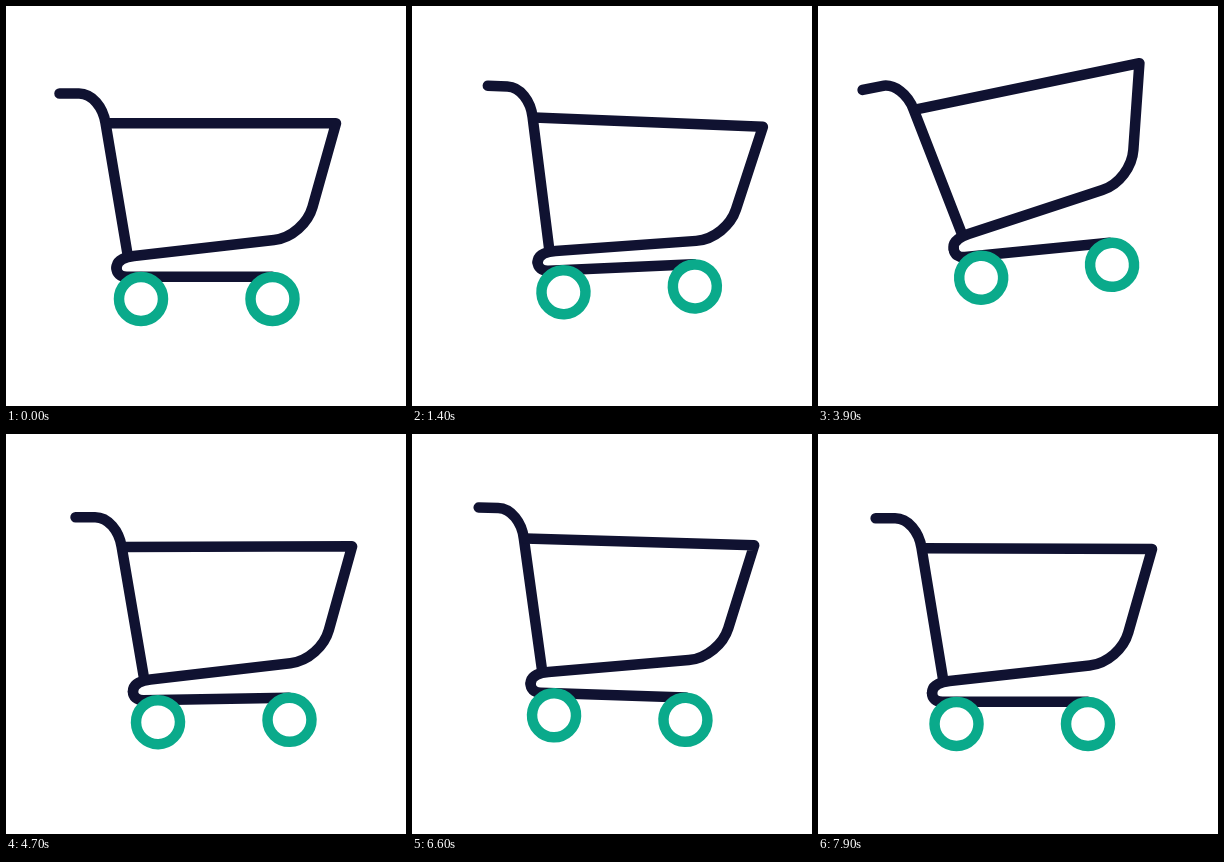
Animation, 400 px wide and 400 px high, one loop 8 s. Source, as an HTML page:

```html
<!DOCTYPE html>
<html lang="en">
<head>
<meta charset="utf-8">
<title>Shopping cart</title>
<style>
  html, body { margin: 0; height: 100%; overflow: hidden; background: #fff; }
  svg { display: block; width: 100vw; height: 100vh; }
  path { fill: none; stroke: #101231; stroke-width: 10.5; stroke-linecap: round; stroke-linejoin: round; }
  circle { fill: #fff; stroke: #0aaa8b; stroke-width: 10.5; }
</style>
</head>
<body>
<svg viewBox="0 0 400 400">
  <g id="base">
    <path d="M110.5 262C110.5 267 114 270.8 121 270.8H266"/>
    <g id="basket">
      <path d="M53.5 87.5H73C86 87.5 97 101 99.5 117L121.5 248"/>
      <path d="M101 117.3H330L306.5 201C302 217 286 232 268 234L128 250C116 251.5 110.5 255 110.5 262"/>
    </g>
    <circle cx="135" cy="293" r="22"/>
    <circle cx="266.5" cy="293" r="22"/>
  </g>
</svg>
<script>
const LOOP = 8, STEP = 0.1;
const base = document.getElementById('base');
const basket = document.getElementById('basket');

function draw(t) {
  // Smooth 0 to 1 between two times, in seconds
  const ease = (from, to) => {
    const u = Math.min(1, Math.max(0, (t - from) / (to - from)));
    return u * u * (3 - 2 * u);
  };
  const land = ease(3.45, 5.1);   // coming down from the wheelie
  const settle = ease(6.1, 7.35); // coming down from the second hop

  const x = 135 + 29 * ease(0.5, 2.15) - 14.5 * ease(3.7, 5.1) - 11 * ease(4.3, 8);
  const y = 293 - 26 * (ease(0.9, 2.4) - land) - 18 * (ease(4.5, 5.9) - settle) - 3 * ease(7.3, 7.9);
  const tilt = -6.9 * (ease(0.7, 2.4) - land) + 3 * (ease(4.7, 5) - settle);

  // The basket rocks back and forth on its hinge
  const lean = 4.3 * ease(0, 1) - 17 * ease(1, 2.9) + 1.2 * ease(3.3, 4.1) + 18 * ease(4.2, 5.05)
    - 9.5 * ease(5, 5.9) + 8.2 * ease(6, 7.1) - 5 * ease(7.1, 7.9);

  base.setAttribute('transform', `translate(${x} ${y}) rotate(${tilt}) translate(-135 -293)`);
  basket.setAttribute('transform', `rotate(${lean - tilt} 110.5 262)`);
}

const start = performance.now();
function tick() {
  const t = (performance.now() - start) / 1000 % LOOP;
  draw(Math.floor(t / STEP) * STEP);
  requestAnimationFrame(tick);
}
tick();
</script>
</body>
</html>
```
